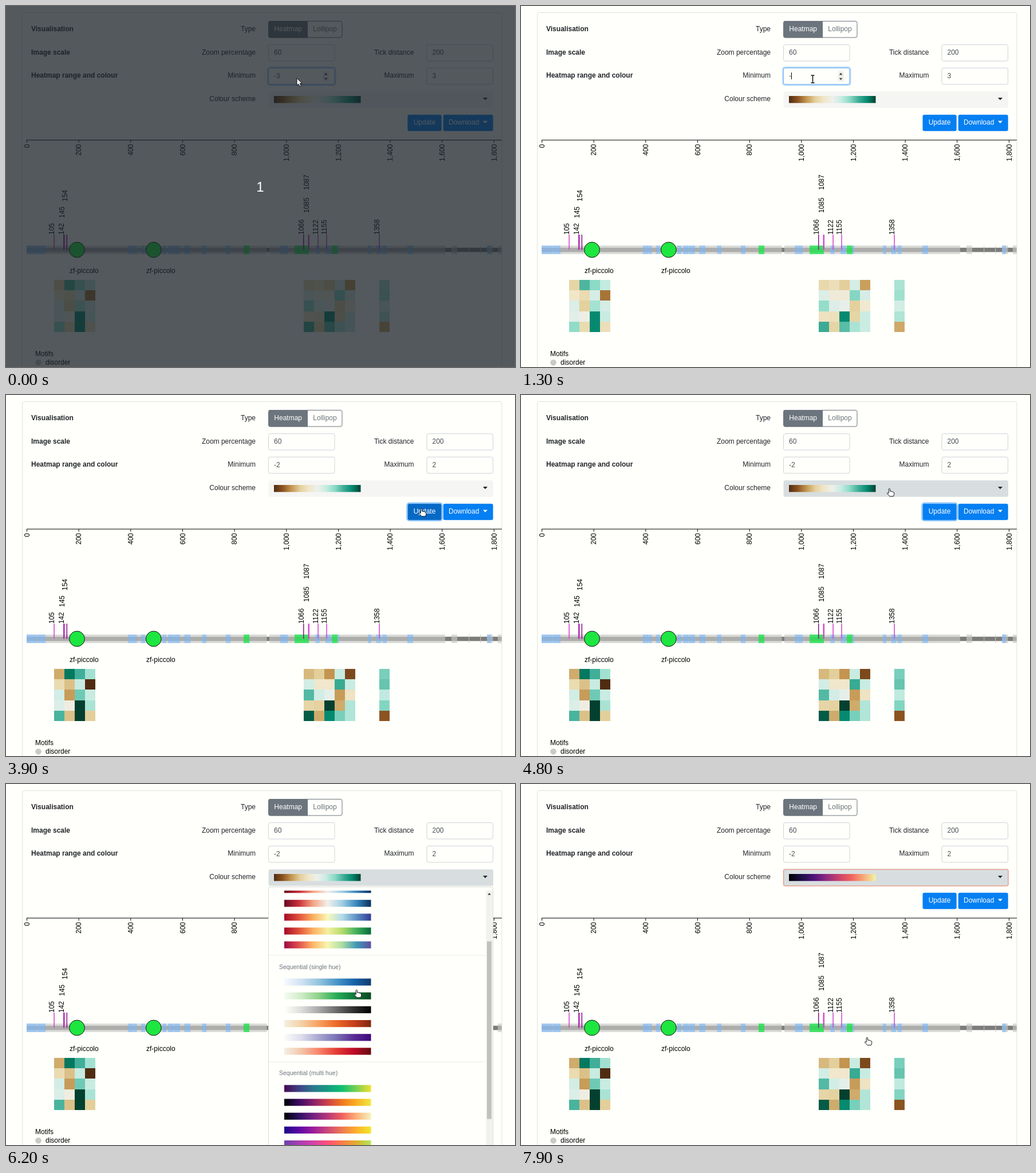
These frames come from a looping animation (889x630 px, 8000 ms). An HTML page:

```html
<!DOCTYPE html>
<html lang="en">
<head>
<meta charset="utf-8">
<title>Heatmap settings</title>
<style>
  html, body { margin: 0; width: 100%; height: 100%; overflow: hidden; background: #fffffb; }
  svg { display: block; }
  text { font: 12px "Liberation Sans", Arial, sans-serif; fill: #212529; white-space: pre; }
  .b { font-weight: bold; }
  .k { fill: #000; }
  .v { fill: #495057; }
  .w { fill: #fff; }
  .h { font-size: 10.5px; fill: #6c757d; }
  .box { fill: #fffffb; stroke: #ced4da; }
  .cells { shape-rendering: crispEdges; }
</style>
</head>
<body>
<svg id="stage" width="889" height="630" viewBox="0 0 889 630"></svg>
<script>
const LOOP = 8000, STEP = 100;

// ---- markup helpers ----
const rect = (x, y, w, h, fill, more = '') =>
  `<rect x="${x}" y="${y}" width="${w}" height="${h}" fill="${fill}" ${more}/>`;
const text = (x, y, s, cls = '', anchor = 'start', more = '') =>
  `<text x="${x}" y="${y}" class="${cls}" text-anchor="${anchor}" ${more}>${s}</text>`;
const upright = (x, y, s, anchor) =>
  `<text transform="translate(${x} ${y}) rotate(-90)" class="k" text-anchor="${anchor}">${s}</text>`;
const line = (x1, y1, x2, y2, stroke, w = 1) =>
  `<path d="M${x1} ${y1}L${x2} ${y2}" stroke="${stroke}" stroke-width="${w}"/>`;
const path = (d, fill, more = '') => `<path d="${d}" fill="${fill}" ${more}/>`;
const group = (id, body, more = '') => `<g id="${id}" ${more}>${body}</g>`;

// ---- colour ramps ----
const DIVERGING = [
  '4f2c10 8b5320 c39550 e3cf9a f0e6c8 eef0ec c8ece2 8bdac6 40ae98 058a70 04402f',
  '40104f 7a3f90 c2a5cf eeeaee a6dba0 2a8f4a 08451f',
  '8e0a52 d0408e f0b8dc f3f1ee b8e186 6ab030 2a6b1c',
  '2d0a4b 5a3f92 b2abd2 f2f0ea fdc078 d07818 7f3b10',
  '670a20 c8303c f4a582 f2f0ec a0cfe4 3a86bc 08305f',
  '670a20 c8303c f4a582 f2f0ec a0cfe4 3a86bc 08305f',
  'a50a28 e0503a fdb060 f8f8b8 b0dcea 5c90c4 343a94',
  'a50a28 e0503a fdb060 f4f0a0 b4dc6c 40b05c 046a38',
  '9e0a44 e0504c fdb868 f6f6b0 acdca4 3e98b4 5e50a2'
];
const SINGLE = [
  'f5faff cfe1f2 93c4de 4a97c9 1764ab 103a70',
  'f5fcf4 cdecc6 8dd088 28ad58 107a3c 08481f',
  'fffffb dcdcdc a8a8a8 6c6c6c 303030 000000',
  'f2f0e0 f4d0a4 f8a060 ec6a28 c8401c 7f2610',
  'fcfbfd dcdcec a8a6d0 7a72b4 582c94 3f067d',
  'f4f0e4 f4c4a8 f88468 e43c34 c00a28 670c10'
];
const MULTI = [
  '44084f 423f84 2a788e 149a80 10c070 7ad151 f0e030',
  '000004 3a0a62 88206a cc4248 f07820 fab020 f0e840',
  '000004 2c1160 721f81 b73779 f1605d feb078 f4f2bc',
  '1c0887 5c06a6 9a1c9c cc4878 ee7a50 fdb02c f0e828',
  '6e40aa a83cb4 d440a8 fc5078 fc7c48 e0b030 b0e858',
  '6e40aa 4c6edb 20a4e0 10dcb4 08f090 10f870 70f050',
  '000000 1a1e40 10703c 88804c d07e94 c4a8ec ffffff',
  'f5fcfa d0eeea 88d0b8 40b078 107c3c 08451c',
  'f5fafc c4d6e8 94b0d4 8c78b8 841888 4d104b',
  'f2f8e8 ccebc5 98d8c0 4cb4d0 1478b4 0c4080',
  'f6f0e0 fdd4a0 fc9c6c ec6044 c41418 7f0a0c'
];
const MAGMA = '000004 1c1044 4f127b 8c2981 c8406c f1605d f8a878 f0f4a4';
const ramps = [];
const ramp = stops => {
  const list = stops.split(' ');
  const id = 'r' + ramps.length;
  ramps.push(`<linearGradient id="${id}">` + list.map((c, i) =>
    `<stop offset="${i / (list.length - 1)}" stop-color="#${c}"/>`).join('') + '</linearGradient>');
  return `url(#${id})`;
};

const scheme = DIVERGING[0].split(' ').map(c => [0, 2, 4].map(i => parseInt(c.slice(i, i + 2), 16)));
function shade(value, range) {
  const p = (Math.max(-1, Math.min(1, value / range)) + 1) * 5;
  const i = Math.min(9, Math.floor(p));
  return `rgb(${scheme[i].map((c, k) => Math.round(c + (scheme[i + 1][k] - c) * (p - i)))})`;
}

// ---- settings form ----
const label = (x, y, s) => text(x, y, s, '', 'end');
const input = (x, y, s, id = '') =>
  rect(x, y, 115.5, 28.5, '#fffffb', 'rx="3" class="box"') +
  text(x + 9.5, y + 17.3, s, 'v', 'start', id && `id="${id}"`);
const focus = (id, x, y) => group(id,
  rect(x, y, 115.5, 28.5, 'none', 'rx="3" stroke="#80bdff"') +
  rect(x - 1.4, y - 1.4, 118.3, 31.3, 'none', 'rx="4" stroke="#007bff" stroke-opacity=".28" stroke-width="2.2"') +
  rect(x + 95, y + 5.5, 10.5, 18, '#efefee') +
  path(`M${x + 97.3} ${y + 12}l2.8-3.6 2.8 3.6zM${x + 97.3} ${y + 17.5}l2.8 3.6 2.8-3.6z`, '#404040'));
const arrowDown = (x, y, fill) => path(`M${x} ${y}h8l-4 4.2z`, fill);
const BLUE = '#057ff2';

const form =
  rect(28.5, 11.5, 837.5, 640, 'none', 'rx="3" stroke="#dfdfdc"') +
  text(44, 44, 'Visualisation', 'b') + text(44, 84.7, 'Image scale', 'b') +
  text(44, 125.4, 'Heatmap range and colour', 'b') +
  label(436, 44, 'Type') + label(436, 84.7, 'Zoom percentage') + label(436, 125.4, 'Minimum') +
  label(436, 166.2, 'Colour scheme') + label(712.5, 84.7, 'Tick distance') + label(712.5, 125.4, 'Maximum') +
  rect(458.5, 26.5, 128.5, 28.5, '#fffffb', 'rx="3" stroke="#6c757d"') +
  path('M527 26v29.5h-65.500a3 3 0 0 1-3-3v-23.500a3 3 0 0 1 3-3z', '#6c757d') +
  text(492.7, 44, 'Heatmap', 'w', 'middle') +
  text(557, 44, 'Lollipop', '', 'middle', 'style="fill:#6c757d"') +
  input(458.5, 67.5, '60') + input(735, 67.5, '200') +
  input(458.5, 108.2, '-3', 'min') + input(735, 108.2, '3', 'max') +
  focus('minFocus', 458.5, 108.2) + focus('maxFocus', 735, 108.2) +
  rect(0, 116, 0, 13, '#e8604c', 'id="mark"') + text(0, 125.500, '', 'w', 'start', 'id="markText"') +
  rect(0, 116, 1, 12, '#000', 'id="caret"') +
  rect(458.5, 149, 392.5, 28.8, '#f5f5f4', 'rx="3" id="select"') +
  rect(468, 157, 151.5, 12.3, ramp(DIVERGING[0]), 'id="chosen"') + arrowDown(833, 160, '#212529') +
  rect(701.5, 189.7, 59.2, 28.5, BLUE, 'rx="3" id="update"') +
  rect(700.5, 188.7, 61.2, 30.5, 'none', 'rx="4" stroke="#80c0fc" stroke-width="2.2" id="updateRing"') +
  text(731, 207, 'Update', 'w', 'middle') +
  rect(763.7, 189.7, 87, 28.5, BLUE, 'rx="3"') + text(773, 207, 'Download', 'w') + arrowDown(833, 200.5, '#fff');

// ---- protein plot ----
const SCALE = 0.4533, pos = n => 36.5 + n * SCALE;
let axis = line(36, 234, 866, 234, '#000');
for (let n = 0; n <= 1800; n += 200) {
  const s = n < 1000 ? n : '1,' + String(n).slice(1);
  axis += line(pos(n), 234, pos(n), 238.5, '#000') + upright(pos(n) + 4.2, 241, s, 'end');
}
const spans = (list, fill) => list.map(([a, b]) => rect(a, 418, b - a, 15, fill)).join('');
const band =
  rect(36, 421.8, 829.5, 7.6, '#7c7c7a') +
  spans([[36, 455.5], [460, 767], [778, 788], [808, 809.3], [828, 829.5], [840, 850.5], [859, 865.5]], 'rgba(200,200,198,.65)') +
  spans([[36, 54], [54.6, 69], [213, 223], [223.500, 228.5], [236, 243], [273, 280], [283, 293], [293.6, 304],
    [311.5, 322], [342.5, 350], [384, 392], [478.5, 492], [540.5, 548], [558, 568], [579.5, 582],
    [632, 638], [646.5, 655], [657.5, 665], [701, 711], [840.5, 847]], 'rgba(120,185,255,.58)') +
  spans([[415, 425], [504, 529], [569, 579]], 'rgba(20,230,70,.75)');

const PINK = '#d44ccb', PURPLE = '#8b1a90';
const variants = [[105, 399, PINK], [142, 399, PURPLE], [145, 370, PINK], [154, 341, PURPLE],
  [1066, 399, PURPLE], [1085, 361, PINK], [1087, 321, PINK], [1122, 399, PINK], [1155, 399, PINK], [1358, 399, PINK]]
  .map(([n, y, c]) => line(pos(n), 399, pos(n), 425.5, c, 1.6) + upright(pos(n) + .2, y, n, 'start')).join('');
const domain = (x, tx) =>
  `<circle cx="${x}" cy="425.5" r="13.4" fill="#1ee640" stroke="#111"/>` + text(tx, 465.5, 'zf-piccolo', 'k');

// Heatmap blocks: left edge and rows of scores.
const blocks = [
  [84, [[-1.05, 1.7, 1.2, .65], [-.6, -.9, .4, -2.1], [.3, -1.15, .95, .4], [.2, -.12, 2.4, .6], [1.15, -.9, 2.4, -.8]]],
  [519.5, [[-.95, -.8, -1.2, .4, -1.7], [.3, -.35, -.35, 1.25, .4], [1.1, .3, .1, -1.15, -.45],
    [-.7, -.75, 2.4, -1.05, .55], [1.85, -1.05, 1.6, .9, .55]]],
  [652, [[.9], [1], [.45], [.85], [-1.6]]]
];
const heatmap = range => blocks.map(([x, rows]) => rows.map((row, j) => row.map((v, i) =>
  rect(x + i * 18.12, 478 + j * 18.2, 18.12, 18.2, shade(v, range))).join('')).join('')).join('');

const plot = axis + band + variants + domain(124, 111) + domain(257.8, 245) +
  group('wide', heatmap(3), 'class="cells"') + group('narrow', heatmap(2), 'class="cells"') +
  text(51, 611, 'Motifs', 'k') + '<circle cx="56.5" cy="622.3" r="5.3" fill="#c9c9c6"/>' + text(69, 626.3, 'disorder', 'k');

// ---- drop-down menu ----
const PITCH = 24.17;
const section = (title, y, list) => text(477, y + 3.8, title, 'h') +
  list.map((c, i) => rect(486, y + 20.8 + i * PITCH, 151.5, 12.2, ramp(c))).join('');
const rule = y => line(459, y, 838.5, y, '#e9ecea');
const menu = group('menu',
  rect(458.5, 179.5, 392, 470, '#fffffb', 'rx="3" stroke="#d8d8d5"') +
  '<g clip-path="url(#view)">' + group('list',
    rect(459, 214, 379.5, 24, '#0880ec') + rect(459, 0, 379.5, 24, '#f5f5f4', 'id="hover"') +
    section('Diverging', 199, DIVERGING) + rule(437.5) +
    section('Sequential (single hue)', 457.2, SINGLE) + rule(623.5) +
    section('Sequential (multi hue)', 643, MULTI)) + '</g>' +
  rect(838.5, 186, 11, 444, '#f1f1ef') + rect(840, 196.5, 8, 310, '#c1c1c0', 'id="thumb"') +
  path('M841.5 193.500l2.600-3.500 2.600 3.500z', '#a3a3a3', 'id="scrollUp"'));

const selectRing = rect(458.5, 149, 392.5, 28.8, 'none', 'rx="3" stroke="#e6a08e" stroke-width="1.5" id="selectRing"');
const dim = group('dim', rect(0, 0, 889, 630, 'rgb(26,34,40)', 'fill-opacity=".75"') +
  text(444, 324, '1', 'w', 'middle', 'style="font-size:24px"'));

// ---- pointers ----
const ink = 'stroke="#111" stroke-width="1" stroke-linejoin="round"';
const pointers =
  group('arrow', path('M0 0v12.500l2.900-2.600 2 4.500 2.300-1-2-4.400h4z', '#fff', ink)) +
  group('beam', path('M-3-6.500h2q1 0 1 1q0-1 1-1h2M-3 6.500h2q1 0 1-1q0 1 1 1h2M0-6v12', 'none', 'stroke="#111" stroke-width="1.500"')) +
  group('hand', path('M3.200 8.500V1.600q0-1.300 1.200-1.300t1.200 1.300v3.500q2.600-.6 3.400.6q1.700-.3 2.100.8q1.600 0 1.600 1.600v2.400l-1.200 3.300h-6.500l-4.300-4.600q-.6-1.400.7-1.600z', '#fff', ink));

const stage = document.getElementById('stage');
const magma = ramp(MAGMA);
stage.innerHTML = form + plot + menu + selectRing + dim + group('pointer', pointers) +
  '<defs><clipPath id="view"><rect x="459" y="186" width="380" height="444"/></clipPath>' + ramps.join('') + '</defs>';
const el = {};
stage.querySelectorAll('[id]').forEach(e => el[e.id] = e);
const set = (id, attrs) => { for (const k in attrs) el[id].setAttribute(k, attrs[k]); };
const show = (id, on) => { el[id].style.display = on ? '' : 'none'; };

// ---- timeline ----
const MIN = [[0, '-3'], [700, ''], [1300, '-'], [1700, '-2']];
const MAX = [[0, '3'], [2900, ''], [3000, '2']];
// Selected text: x, width, characters.
const MARK = [[0, null], [500, [472.2, 7, '3']], [600, [468, 11, '-3']], [700, null], [2700, [744.5, 7, '3']], [2900, null]];
const CARET = [[0, 0], [700, 468], [1300, 472], [1700, 479], [2600, 751.5], [2700, 0], [2900, 744.5], [3000, 751.5], [3600, 0]];
const HOVER = [[0, 0], [5600, 2], [5700, 3], [5900, 0]];
const SHAPE = [[0, 'arrow'], [100, 'beam'], [2200, 'arrow'], [2400, 'beam'], [3100, 'arrow'], [3200, 'hand']];
const MOVE = [[0, 508, 126], [100, 509.5, 127.5], [1900, 509.5, 127.5], [2100, 538, 129], [2200, 600, 131], [2300, 670, 131],
  [2400, 735, 130], [2500, 757, 128], [2600, 757, 127], [2800, 730, 126.5], [3000, 729, 128], [3100, 729, 140],
  [3200, 725, 160], [3400, 721, 198], [4500, 721, 198], [4600, 714, 190], [4700, 682, 172], [4800, 639, 163],
  [5300, 639, 163], [5500, 632, 183], [5600, 624, 207], [5700, 613, 292], [5800, 613, 292], [6000, 608, 350],
  [6200, 608, 359], [7000, 608, 359], [7100, 616, 405], [7200, 626, 456], [7300, 622, 450],
  [7400, 622, 450], [7900, 600, 442]];
const SCROLL = [[0, 0], [5900, 0], [6000, 22], [6400, 255], [6500, 280]];

const at = (table, t) => table.filter(k => k[0] <= t).pop()[1];
function blend(table, t) {
  const i = table.findIndex(k => k[0] > t);
  if (i < 0) return table[table.length - 1].slice(1);
  const a = table[i - 1], b = table[i], p = (t - a[0]) / (b[0] - a[0]);
  return a.slice(1).map((v, k) => v + (b[k + 1] - v) * p);
}

function draw(t) {
  show('dim', t < 100);
  el.min.textContent = at(MIN, t);
  el.max.textContent = at(MAX, t);
  show('minFocus', t < 2600);
  show('maxFocus', t >= 2600 && t < 3600);

  const mark = at(MARK, t), caret = at(CARET, t);
  show('mark', mark);
  show('markText', mark);
  if (mark) {
    set('mark', { x: mark[0], width: mark[1] });
    set('markText', { x: mark[0] });
    el.markText.textContent = mark[2];
  }
  show('caret', caret);
  set('caret', { x: caret });

  set('update', { fill: t >= 3400 && t < 4600 ? '#0669c6' : BLUE });
  show('updateRing', t >= 3600 && t < 5000);
  show('wide', t < 3800);
  show('narrow', t >= 3800);

  set('select', { fill: t >= 4700 ? '#d8dee0' : '#f5f5f4' });
  set('chosen', { fill: t >= 7600 ? magma : 'url(#r0)' });
  show('selectRing', t >= 7600);
  show('menu', t >= 5000 && t < 7500);
  const [scroll] = blend(SCROLL, t), row = at(HOVER, t);
  set('list', { transform: `translate(0 ${-scroll})` });
  set('thumb', { y: 196.5 + scroll * .564 });
  set('scrollUp', { fill: scroll ? '#303030' : '#a3a3a3' });
  show('hover', row);
  set('hover', { y: 214 + (row - 1) * 24 });

  const shape = at(SHAPE, t);
  ['arrow', 'beam', 'hand'].forEach(id => show(id, id === shape));
  set('pointer', { transform: `translate(${blend(MOVE, t)})` });
}

const start = performance.now();
let last = -1;
function tick() {
  const t = Math.floor((performance.now() - start) % LOOP / STEP) * STEP;
  if (t !== last) draw(last = t);
  requestAnimationFrame(tick);
}
tick();
</script>
</body>
</html>
```
